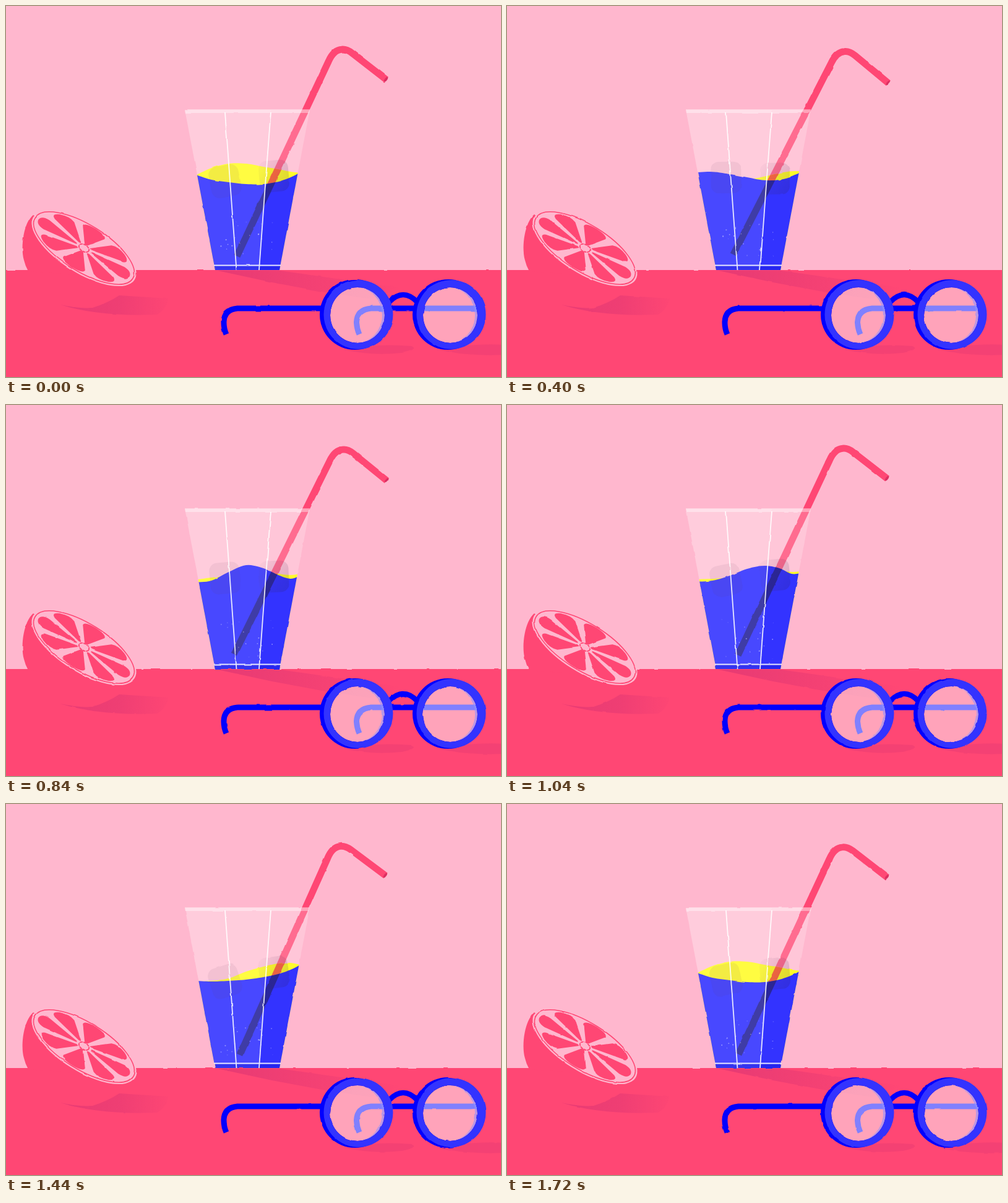
Write an HTML page that moves like this. It is 800 by 600 pixels and loops after 1.76 s.

```html
<!DOCTYPE html>
<html lang="en">
<head>
<meta charset="utf-8">
<title>Summer drink</title>
<style>
  html, body { margin: 0; width: 100%; height: 100%; overflow: hidden; background: #ffb7ce; }
  svg { display: block; width: 800px; height: 600px; }
</style>
</head>
<body>
<svg viewBox="0 0 800 600">
  <defs>
    <filter id="rough" filterUnits="userSpaceOnUse" x="-10" y="-10" width="820" height="620" color-interpolation-filters="sRGB">
      <feTurbulence id="noise" type="fractalNoise" baseFrequency=".06" numOctaves="1"/>
      <feDisplacementMap in="SourceGraphic" scale="2.6" xChannelSelector="R" yChannelSelector="G"/>
    </filter>
    <linearGradient id="fruitShade" x1="0" x2="1">
      <stop stop-color="#c92a72" stop-opacity=".42"/>
      <stop offset=".55" stop-color="#c92a72" stop-opacity=".3"/>
      <stop offset="1" stop-color="#c92a72" stop-opacity="0.03"/>
    </linearGradient>
    <linearGradient id="glassShade" x1="0" x2="1">
      <stop stop-color="#c92a72" stop-opacity=".45"/>
      <stop offset="1" stop-color="#c92a72" stop-opacity="0"/>
    </linearGradient>
    <linearGradient id="iceShade" x1="0" y1="0" x2="1" y2=".7">
      <stop stop-color="#503050" stop-opacity=".02"/>
      <stop offset="1" stop-color="#302050" stop-opacity=".17"/>
    </linearGradient>
    <path id="back"/>
    <path id="front"/>
    <path id="straw" d="M371.5 404 L522 90 Q530 72 543 71 Q551 70 560 77 L615 120.5" fill="none" stroke-width="11"/>
    <clipPath id="inGlass"><path d="M289 168 H491 L442 427 H338Z"/></clipPath>
    <clipPath id="inBack"><use href="#back"/></clipPath>
    <clipPath id="inFront"><use href="#front"/></clipPath>
  </defs>

  <g filter="url(#rough)">
    <rect x="-20" y="-20" width="840" height="640" fill="#ffb7ce"/>
    <rect x="-20" y="427" width="840" height="200" fill="#ff4774"/>

    <!-- Shadows -->
    <path d="M88 483 Q118 490 140 488 Q165 480 183 468 L262 473 Q262 487 245 499 Q150 503 88 483Z" fill="url(#fruitShade)"/>
    <path d="M342 428 H443 L640 456 L590 474 L510 462 L430 447Z" fill="url(#glassShade)"/>
    <g fill="#c92a72" opacity=".2">
      <path d="M548 556 Q600 545 655 550 Q668 555 640 561 Q590 566 548 556Z"/>
      <path d="M700 556 Q750 545 810 548 V564 Q745 567 700 556Z"/>
    </g>

    <!-- Citrus half -->
    <path d="M44 337 C29 350 23 388 29 411 Q31 420 36 429 L180 440 Z" fill="#ff4774"/>
    <g transform="translate(126 391.5) rotate(32)" stroke="#ff4774">
      <ellipse rx="96.5" ry="40.5" fill="#ffb7ce" stroke="none"/>
      <ellipse rx="93" ry="37.5" fill="none" stroke-width="1.6"/>
      <g id="segments" transform="scale(96.5 40.5)" fill="#ff4774" stroke-width=".06" stroke-linejoin="round"/>
      <ellipse rx="9" ry="5.5" fill="#ffb7ce" stroke-width="1.8" stroke-dasharray="5 1"/>
    </g>

    <!-- Drink -->
    <g class="sway" stroke="#ff4774">
      <use href="#straw"/>
      <ellipse cx="614.5" cy="120" rx="2" ry="4.5" transform="rotate(38 614.5 120)" fill="#dc2f62" stroke="none"/>
    </g>
    <path d="M289 168 H491 L442 427 H338Z" fill="#fff" opacity=".2"/>
    <g clip-path="url(#inGlass)">
      <use href="#back" fill="#fffb2b"/>
      <g clip-path="url(#inBack)"><use class="sway" href="#straw" stroke="#ff4744" opacity=".8"/></g>
      <use href="#front" fill="#3333ff"/>
      <g clip-path="url(#inFront)"><use class="sway" href="#straw" stroke="#24205f" opacity=".62"/></g>
    </g>
    <rect id="iceLeft" x="-24.5" y="-25.5" width="49" height="51" rx="13" fill="#503050" opacity=".08"/>
    <rect id="iceRight" x="-24" y="-25.5" width="48" height="51" rx="13" fill="url(#iceShade)"/>
    <g id="bubbles" fill="#fff"/>
    <path d="M289 168 H428 L409 427 H338Z" fill="#fff" opacity=".1"/>
    <path d="M289 167 H491 L490 173 H290Z" fill="#fff" opacity=".38"/>
    <path d="M336.500 420 H443.500 L442 427 H338Z" fill="#1010d0" opacity=".35"/>
    <path d="M354 172 L362 283 L372.500 427 M428 172 L419 290 L409 427 M336 419.500 H444" fill="none" stroke="#fff" stroke-width="1.8" opacity=".88"/>

    <!-- Glasses -->
    <g fill="none" stroke="#00f" stroke-width="9">
      <path d="M514 489 H374 Q352 491 352 512 Q352 522 356 531"/>
      <path d="M762 489 H590 Q567 491 566.500 512 Q567 522 571 531"/>
      <path d="M619 479 Q642 455 665 479" stroke-width="8.500"/>
    </g>
    <g id="lenses"></g>
  </g>
</svg>

<script>
const LOOP = 1760, STEP = 40;
const $ = id => document.getElementById(id);

// Smooth curve through (xs, ys), evaluated at x.
function spline(xs, ys, x) {
  const last = xs.length - 1;
  let i = 0;
  while (i < last - 1 && x > xs[i + 1]) i++;
  const slope = k => {
    const a = Math.max(k - 1, 0), b = Math.min(k + 1, last);
    return (ys[b] - ys[a]) / (xs[b] - xs[a]);
  };
  const h = xs[i + 1] - xs[i], u = (x - xs[i]) / h, v = 1 - u;
  return v * v * (1 + 2 * u) * ys[i] + u * u * (3 - 2 * u) * ys[i + 1]
    + h * u * v * (v * slope(i) - u * slope(i + 1));
}

// Heights of the two liquid edges at xs, one row per key time.
const xs = [304, 332, 360, 388, 416, 440, 460, 476];
const keyTimes = [0, 240, 600, 840, 1040, 1440, 1720];
const frontPoses = [
  [272, 281, 285, 288, 288, 284, 277, 269],
  [260, 270, 278, 282, 283, 281, 277, 271],
  [284, 270, 266, 270, 279, 281, 276, 265],
  [287, 284, 270, 259, 264, 275, 281, 276],
  [286, 284, 276, 265, 260, 264, 273, 272],
  [286, 287, 286, 284, 280, 275, 268, 260]
];
const backPoses = [
  [275, 262, 255, 255, 260, 264, 268, 270],
  [258, 268, 274, 277, 276, 274, 272, 270],
  [290, 285, 285, 281, 272, 265, 262, 265],
  [283, 279, 276, 272, 271, 273, 275, 273],
  [282, 281, 279, 275, 270, 268, 270, 269],
  [287, 286, 282, 271, 263, 258, 257, 260]
];

const wrappedTimes = [1440 - LOOP, 1720 - LOOP, ...keyTimes, LOOP, 240 + LOOP];
function surface(poses, t) {
  const rows = [poses[5], poses[0], ...poses, poses[0], poses[0], poses[1]];
  const ys = xs.map((_, i) => spline(wrappedTimes, rows.map(row => row[i]), t));
  let d = "M300 430";
  for (let x = 300; x <= 480; x += 4) d += `L${x} ${spline(xs, ys, x).toFixed(2)}`;
  return d + "V430Z";
}

let seed = 7;
const random = () => (seed = seed * 16807 % 2147483647) / 2147483647;

const polar = (r, deg) => {
  const a = deg * Math.PI / 180;
  return `${(r * Math.cos(a)).toFixed(3)} ${(r * Math.sin(a)).toFixed(3)}`;
};
for (let a = 0; a < 360; a += 45) {
  $("segments").innerHTML += `<path d="M${polar(.17, a)} L${polar(.76, a - 14)}
    Q${polar(.88, a - 12)} ${polar(.87, a)} Q${polar(.88, a + 12)} ${polar(.76, a + 14)}Z"/>`;
}

for (const x of [568, 718]) {
  const hole = `M${x - 44} 500 a44 45 0 1 0 88 0 a44 45 0 1 0 -88 0Z`;
  const disc = (cx, r) => `M${cx - r} 499 a${r} ${r} 0 1 0 ${2 * r} 0 a${r} ${r} 0 1 0 ${-2 * r} 0Z`;
  $("lenses").innerHTML += `
    <path d="${hole}" fill="#fff" opacity=".5"/>
    <path d="${hole}M${x - 44} 500 a42 45 0 1 0 84 0 a42 45 0 1 0 -84 0Z" fill="#8f8fff" fill-rule="evenodd" opacity=".6"/>
    <path d="${disc(x - 4, 57)}${hole}" fill="#00f" fill-rule="evenodd"/>
    <path d="${disc(x + 1.5, 56)}${hole}" fill="#33f" fill-rule="evenodd"/>`;
}

const bubbles = Array.from({ length: 22 }, () => {
  const dot = document.createElementNS("http://www.w3.org/2000/svg", "circle");
  dot.setAttribute("r", .6 + random() * .6);
  $("bubbles").append(dot);
  return { dot, x: 343 + random() * 95, phase: random() };
});

function draw(t) {
  const swing = Math.sin(2 * Math.PI * (t - 80) / LOOP);
  $("front").setAttribute("d", surface(frontPoses, t));
  $("back").setAttribute("d", surface(backPoses, t));
  for (const el of document.querySelectorAll(".sway"))
    el.setAttribute("transform", `rotate(${1.6 * swing} 447 175)`);
  $("iceLeft").setAttribute("transform", `translate(354 ${282 - 5 * swing}) rotate(${9 * swing - 9})`);
  $("iceRight").setAttribute("transform", `translate(433 ${276 + 3.5 * swing}) rotate(${4 * swing - 4})`);
  for (const { dot, x, phase } of bubbles) {
    const rise = (phase + t / LOOP) % 1;
    dot.setAttribute("cx", x + Math.sin(rise * 9 + phase * 6));
    dot.setAttribute("cy", 414 - rise * 70);
    dot.setAttribute("opacity", .45 * Math.sin(Math.PI * rise));
  }
  $("noise").setAttribute("seed", t / STEP + 1);
}

let shown = -1;
const start = performance.now();
function tick() {
  const t = Math.floor((performance.now() - start) % LOOP / STEP) * STEP;
  if (t !== shown) draw(shown = t);
  requestAnimationFrame(tick);
}
tick();
</script>
</body>
</html>
```
